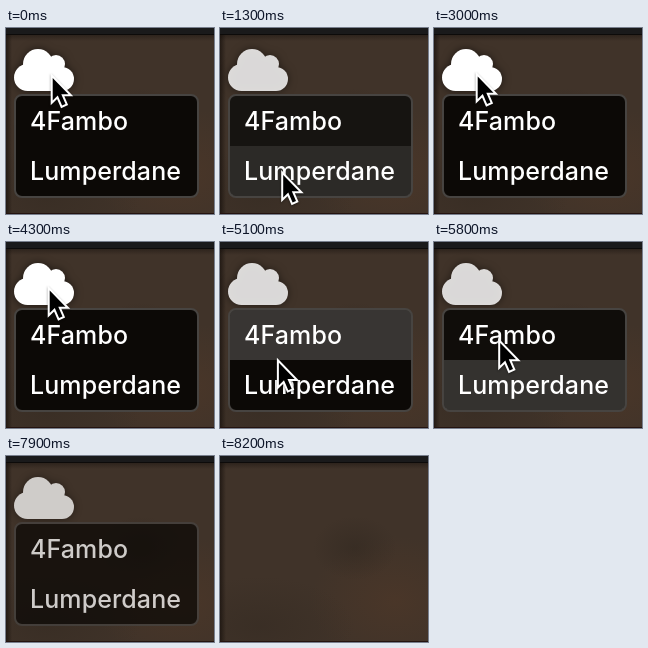
Animation, 208 px wide and 186 px high, one loop 9.5 s. Source, as an HTML page:

```html
<!DOCTYPE html>
<html lang="en">
<head>
<meta charset="utf-8">
<title>Cloud menu</title>
<style>
  html, body { margin: 0; width: 100%; height: 100%; overflow: hidden; background: #3e3228; }
  svg { display: block; width: 208px; height: 186px; }
  text { font: 500 25px Inter, "Liberation Sans", sans-serif; letter-spacing: .1px; fill: #fff; }
  #shade { filter: drop-shadow(0 0 4px rgba(0, 0, 0, .55)); }
  #cursor { filter: drop-shadow(0 1px 1px rgba(0, 0, 0, .4)); }
</style>
</head>
<body>
<svg viewBox="0 0 208 186">
  <defs>
    <radialGradient id="warm">
      <stop offset="0" stop-color="#503828"/>
      <stop offset="1" stop-color="#503828" stop-opacity="0"/>
    </radialGradient>
    <radialGradient id="dim">
      <stop offset="0" stop-color="#30271f"/>
      <stop offset="1" stop-color="#30271f" stop-opacity="0"/>
    </radialGradient>
    <linearGradient id="edge">
      <stop offset="0" stop-color="#17100c" stop-opacity=".7"/>
      <stop offset="1" stop-color="#17100c" stop-opacity="0"/>
    </linearGradient>
    <linearGradient id="top" x2="0" y2="1">
      <stop offset="0" stop-color="#120d0a" stop-opacity=".4"/>
      <stop offset="1" stop-color="#120d0a" stop-opacity="0"/>
    </linearGradient>
    <clipPath id="inner"><rect x="10" y="68" width="181" height="100" rx="6"/></clipPath>
  </defs>

  <rect width="208" height="186" fill="#403329"/>
  <ellipse cx="175" cy="145" rx="85" ry="65" fill="url(#warm)" opacity=".6"/>
  <ellipse cx="135" cy="92" rx="42" ry="32" fill="url(#dim)" opacity=".5"/>
  <ellipse cx="40" cy="170" rx="95" ry="50" fill="url(#dim)" opacity=".4"/>
  <rect width="6" height="186" fill="url(#edge)"/>
  <rect y="7" width="208" height="6" fill="url(#top)"/>
  <rect width="208" height="6" fill="#1a1a1b"/>
  <rect y="6" width="208" height="1" fill="#0d0b0a"/>
  <rect y="185" width="208" height="1" fill="#24130f"/>

  <g id="controls">
    <g id="shade">
      <g id="cloud" fill="#fff" transform="translate(8 18) scale(.09375)">
        <circle cx="144" cy="336" r="144"/>
        <circle cx="256" cy="192" r="160"/>
        <circle cx="448" cy="192" r="96"/>
        <circle cx="512" cy="352" r="128"/>
        <rect x="144" y="200" width="368" height="280"/>
      </g>
    </g>
    <g id="menu">
      <rect x="9" y="67" width="183" height="102" rx="7" fill="#0c0906" stroke="#474441" stroke-width="2"/>
      <g clip-path="url(#inner)" fill="#fff">
        <rect id="row1" x="10" y="68" width="181" height="50"/>
        <rect id="row2" x="10" y="118" width="181" height="50"/>
      </g>
      <text x="24" y="102">4Fambo</text>
      <text x="24" y="152">Lumperdane</text>
    </g>
  </g>
  <path id="cursor" d="M2.2 5V27.5L7.3 22.6L11.6 32.5L15 31L10.8 21.2H18Z"
        fill="#000" stroke="#fff" stroke-width="4" paint-order="stroke"/>
</svg>
<script>
  const LOOP = 9500, STEP = 100, FADE = 120, LAG = 50;
  const $ = id => document.getElementById(id);
  const clamp = v => Math.max(0, Math.min(1, v));
  const smooth = v => v * v * (3 - 2 * v);

  // Cursor path: time, x, y
  const path = [
    [300, 44.5, 45], [800, 60, 84], [900, 60, 84], [1000, 60, 89],
    [1300, 61, 142], [1400, 61, 142], [1600, 61, 142], [2200, 60, 94],
    [2500, 60, 94], [3000, 41.5, 43.5], [4500, 41.5, 43.5], [5400, 62, 141],
    [5500, 62, 141], [5700, 64, 131], [5800, 64, 96], [5900, 63, 83],
    [6300, 63, 83], [6700, 45, 42.5]
  ];

  function cursorAt(t) {
    const i = path.findIndex(key => key[0] > t);
    if (i < 0) return path[path.length - 1].slice(1);
    if (i === 0) return path[0].slice(1);
    const [t0, x0, y0] = path[i - 1], [t1, x1, y1] = path[i];
    const k = smooth((t - t0) / (t1 - t0));
    return [x0 + (x1 - x0) * k, y0 + (y1 - y0) * k];
  }

  // Share of the recent past spent over the cloud and each row
  function hoverAt(t) {
    const share = [0, 0, 0], n = 12;
    for (let i = 0; i < n; i++) {
      const y = cursorAt(t - LAG - FADE * (i + .5) / n)[1];
      share[y < 66 ? 0 : y < 118 ? 1 : 2] += 1 / n;
    }
    return share;
  }

  function draw(t) {
    const [cloud, row1, row2] = hoverAt(t);
    $('cursor').setAttribute('transform', `translate(${cursorAt(t)})`);
    $('cursor').style.opacity = t < 7900 ? 1 : 0;
    $('cloud').style.opacity = .83 + .17 * cloud;
    $('row1').style.opacity = .18 * row1;
    $('row2').style.opacity = .18 * row2;
    $('menu').style.opacity = t >= 3700 && t < 4300 ? 0 : 1;
    $('controls').style.opacity = clamp((8200 - t) / 400);
  }

  const start = performance.now();
  function frame() {
    const t = (performance.now() - start) % LOOP;
    draw(Math.floor(t / STEP) * STEP);
    requestAnimationFrame(frame);
  }
  frame();
</script>
</body>
</html>
```
